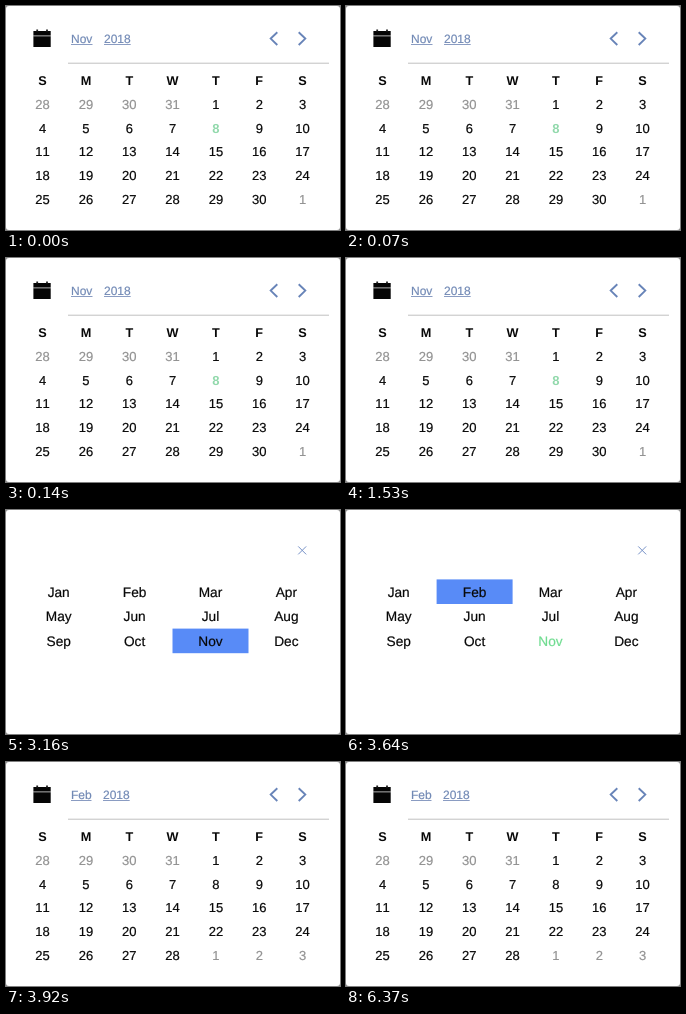
Recreate the animation shown at these times as an HTML page. Size 334x224 px, loop 8000 ms.

```html
<!DOCTYPE html>
<html lang="en">
<head>
<meta charset="utf-8">
<title>Calendar month picker</title>
<style>
html, body { margin: 0; width: 100%; height: 100%; overflow: hidden; background: #8a8a8a; }
svg { display: block; width: 334px; height: 224px; font-family: "Liberation Sans", Arial, sans-serif; }
text { font-size: 13px; font-kerning: none; text-anchor: middle; text-rendering: geometricPrecision; color: #080808; fill: currentColor; stroke: currentColor; stroke-width: .2px; }
.head { font-size: 12.7px; font-weight: bold; stroke: none; }
.muted { color: #929292; }
.today { color: #92d9ac; font-weight: bold; stroke: none; }
.current { color: #70dc91; }
.link { font-size: 12px; text-anchor: start; color: #7189b5; }
.month { font-size: 13.7px; }
.view { opacity: 0; animation: 8s step-end infinite; }
#november { animation-name: november; }
#picker { animation-name: picker; }
#choice { animation-name: choice; }
#february { animation-name: february; }
@keyframes november { 0% { opacity: 1 } 30.625%, 100% { opacity: 0 } }
@keyframes picker { 0% { opacity: 0 } 30.625% { opacity: 1 } 45.5%, 100% { opacity: 0 } }
@keyframes choice { 0% { opacity: 0 } 45.5% { opacity: 1 } 49%, 100% { opacity: 0 } }
@keyframes february { 0% { opacity: 0 } 49%, 100% { opacity: 1 } }
</style>
</head>
<body>
<svg viewBox="0 0 334 224">
  <rect width="334" height="224" rx="3" fill="#fff"/>
  <g id="november" class="view"></g>
  <g id="picker" class="view"></g>
  <g id="choice" class="view"></g>
  <g id="february" class="view"></g>
</svg>
<script>
const MONTHS = 'Jan Feb Mar Apr May Jun Jul Aug Sep Oct Nov Dec'.split(' ');
const LEADING = [28, 29, 30, 31];

const label = (x, y, text, kind = '') => `<text x="${x}" y="${y}" class="${kind}">${text}</text>`;

const link = (x, width, text) => label(x, 36.7, text, 'link') +
  `<path d="M${x} 38.5h${width}" stroke="#8a9cc2"/>`;

const toolbar = `
  <path d="M27.4 25h17.3v4.6H27.4zM27.4 30.2h17.3V41H27.4z" fill="#050505"/>
  <path d="M27.4 29.9h17.3" stroke="#555" stroke-width=".6"/>
  <path d="M31.2 23.6v2M41 23.6v2" stroke="#222" stroke-width="1.8"/>
  <path d="M62 57.2H323" stroke="#c0c0c0"/>
  <path d="M271.3 26.2l-6.6 6.4 6.6 6.4M292.7 26.2l6.6 6.4-6.6 6.4" fill="none" stroke="#6884b8" stroke-width="1.9"/>`;

function calendar(month, lastDay, yearX, today) {
  const column = i => 36.6 + (i % 7) * 43.33;
  let svg = toolbar + link(65, yearX === 98 ? 21.5 : 20.5, month) + link(yearX, 26.7, 2018);
  [...'SMTWTFS'].forEach((day, i) => svg += label(column(i), 79.2, day, 'head'));
  for (let i = 0; i < 35; i++) {
    const day = i - LEADING.length + 1;
    const outside = day < 1 || day > lastDay;
    const text = day < 1 ? LEADING[i] : day > lastDay ? day - lastDay : day;
    const kind = outside ? 'muted' : day === today ? 'today' : '';
    svg += label(column(i), 103.1 + Math.floor(i / 7) * 23.65, text, kind);
  }
  return svg;
}

function monthPicker(selected, current) {
  let svg = '<path d="M292.2 36.4l8 8m0-8l-8 8" stroke="#7590c6"/>';
  MONTHS.forEach((name, i) => {
    const x = 52.7 + (i % 4) * 75.9;
    const y = 69.4 + Math.floor(i / 4) * 24.6;
    if (name === selected) svg += `<rect x="${x - 38}" y="${y}" width="76" height="24.6" fill="#588bf7"/>`;
    svg += label(x, y + 17.3, name, name === current && name !== selected ? 'month current' : 'month');
  });
  return svg;
}

const views = {
  november: calendar('Nov', 30, 98, 8),
  picker: monthPicker('Nov', 'Nov'),
  choice: monthPicker('Feb', 'Nov'),
  february: calendar('Feb', 28, 97)
};
for (const id in views) document.getElementById(id).innerHTML = views[id];
</script>
</body>
</html>
```
